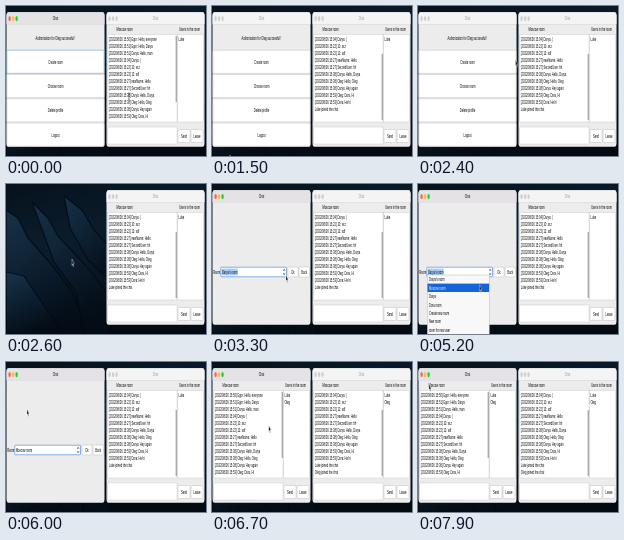
These frames come from a looping animation (200x150 px, 8000 ms). An HTML page:

```html
<!DOCTYPE html>
<html lang="en">
<head>
<meta charset="utf-8">
<title>Chat</title>
<style>
html, body { margin: 0; width: 100%; height: 100%; overflow: hidden; background: #050d16; }
svg { display: block; width: 100vw; height: 100vh; }
text { font: 5.6px "Liberation Sans", Arial, sans-serif; fill: #000; white-space: pre; }
text.pale { fill: #999; }
text.white { fill: #fff; }
</style>
</head>
<body>
<svg id="stage" viewBox="0 0 200 150" preserveAspectRatio="none"></svg>
<script>
const stage = document.getElementById('stage');
const LOOP = 8000, STEP = 100, ROW = 7, ITEM = 8.4, RIGHT = 100;
const SQUEEZE = 0.47; // the whole screen is shown narrowed, so all glyphs share this ratio

const log = [
  '15:50] Egor: Hello, everyone', '15:51] Egor: Hello, Darya', '15:51] Darya: Hello, man',
  '15:04] Darya: (', '15:22] 10: xxz', '15:22] 12: sdf', '15:27] newName: Hello',
  '15:27] SecondUser: hh', '15:38] Darya: Hello, Darya', '15:38] Oleg: Hello, Oleg',
  '15:38] Darya: Hey again', '15:53] Oleg: Dora, Hi', '15:53] Dora: He hi'
].map(s => '[2022/08/26 ' + s).concat('Luke joined the chat', 'Oleg joined the chat');
const rooms = ["Darya's room", 'Moscow room', 'Darya', 'Dora room', 'Create new room', 'New room', 'room for new user'];

// cursor stops: time, x, y
const path = [
  [0, 123, 87], [600, 18, 149], [1600, 18, 149], [2000, 62, 62], [2250, 145, 22], [2500, 66, 75],
  [2800, 66, 75], [3300, 74, 91], [3500, 71, 87], [3900, 71, 87], [4500, 110, 30], [4600, 110, 30],
  [4800, 60, 88], [5300, 62, 104], [5500, 62, 104], [6000, 21, 47], [6200, 113, 60], [6400, 80, 87],
  [6500, 80, 87], [7000, 22, 28], [7100, 22, 28], [7500, 6, 26], [7900, 11, 22], [8000, 11, 22]
];

const rect = (x, y, w, h, fill, more = '') =>
  `<rect x="${x}" y="${y}" width="${w}" height="${h}" fill="${fill}" ${more}/>`;
const label = (x, y, s, anchor = 'middle', cls = '') =>
  `<text class="${cls}" text-anchor="${anchor}" transform="translate(${x} ${y + 1.9}) scale(${SQUEEZE} 1)">${s}</text>`;
const button = (x, y, w, h, s, stroke = '#c8c8c8') =>
  rect(x, y, w, h, '#fff', `rx=".8" stroke="${stroke}" stroke-width=".6"`) + label(x + w / 2, y + h / 2, s);

function frame(active, body) {
  const lights = active ? ['#ff5f57', '#febc2e', '#28c840'] : ['#d0d0d0', '#d0d0d0', '#d0d0d0'];
  return rect(0.5, 6.3, 98, 134.5, '#ececec', 'rx="2" ry="4"') +
    `<path d="M.5 18V10.3Q.5 6.3 2.5 6.3H96.5Q98.5 6.3 98.5 10.3V18Z" fill="${active ? '#e4e2e4' : '#f4f4f4'}"/>` +
    rect(0.5, 18, 98, 0.4, '#cfcfcf') +
    lights.map((c, i) => `<ellipse cx="${3.6 + i * 3.5}" cy="12.6" rx="1.2" ry="2.6" fill="${c}"/>`).join('') +
    label(49.5, 12.5, 'Chat', 'middle', active ? '' : 'pale') + body;
}

function menu(active) {
  return label(49, 32, 'Authorization for Oleg successful!') +
    ['Create room', 'Choose room', 'Delete profile', 'Logout'].map((s, i) =>
      button(0.9, 44.2 + i * 24.3, 97.2, 23.1, s, active && !i ? '#6ea3dc' : '#c8c8c8')).join('');
}

function chat(first, last, users) {
  const box = 'stroke="#c4c4c4" stroke-width=".4"';
  return label(18.6, 23.5, 'Moscow room') + label(83.5, 23.5, 'Users in the room') +
    rect(1.8, 28.5, 69.2, 87.5, '#fff', box) + rect(71.7, 28.5, 25.7, 87.5, '#fff', box) +
    log.slice(first, last).map((s, i) => label(2.8, 33 + i * ROW, s, 'start')).join('') +
    users.map((s, i) => label(72.5, 33 + i * ROW, s, 'start')).join('') +
    rect(69.7, first ? 48 : 30, 1, 66, '#8a8a8a', 'rx=".5"') +
    rect(1.8, 121, 69.2, 17, '#fff', box) +
    button(72, 123.5, 12, 13, 'Send') + button(85, 123.5, 12, 13, 'Leave');
}

function picker(room, marked) {
  return label(1.2, 88, 'Rooms:', 'start') +
    rect(8.8, 83.2, 65.7, 9.6, '#fff', 'rx=".6" stroke="#78a9e0" stroke-width=".9"') +
    (marked ? rect(9.6, 84.6, 16, 6.8, '#a8cdfb') : '') +
    label(9.9, 88, room, 'start') +
    '<path d="M71.3 87L72.2 85L73.1 87M71.3 89L72.2 91L73.1 89" fill="none" stroke="#333" stroke-width=".5"/>' +
    button(76, 83, 10, 10, 'Ok') + button(87, 83, 10.5, 10, 'Back');
}

function popup(current) {
  return rect(9.3, 91, 62, 60, '#f8f8f8', 'stroke="#aaa" stroke-width=".4"') +
    rooms.map((s, i) => (i === current ? rect(9.5, 91.2 + i * ITEM, 61.6, ITEM, '#1763d8') : '') +
      label(11, 95.4 + i * ITEM, s, 'start', i === current ? 'white' : '')).join('');
}

const wallpaper = `<defs>
  <linearGradient id="night" x2=".3" y2="1"><stop stop-color="#06121d"/><stop offset=".45" stop-color="#0b1d2d"/><stop offset="1" stop-color="#040a12"/></linearGradient>
  <linearGradient id="ridge" x2=".4" y2="1"><stop stop-color="#1d3b54"/><stop offset=".6" stop-color="#0c1e2f"/><stop offset="1" stop-color="#050d16"/></linearGradient>
  </defs>` + rect(0, 0, 200, 150, 'url(#night)') +
  ['M0 26L12 34L22 54L45 80L66 108L84 150H0Z', 'M26 18L42 34L52 52L80 82L104 112V150H78L70 108L48 78Z',
   'M58 12L76 26L88 46L110 70V104L82 76L64 44Z', 'M0 88L18 92L30 110L58 150H0Z']
    .map(d => `<path d="${d}" fill="url(#ridge)" stroke="#030910" stroke-width="1.2" stroke-linejoin="round" opacity=".75"/>`).join('');

function cursor(t) {
  const i = path.findIndex(p => p[0] > t);
  const [a, b] = [path[i - 1], path[i]];
  const k = (t - a[0]) / (b[0] - a[0]);
  const x = a[1] + (b[1] - a[1]) * k, y = a[2] + (b[2] - a[2]) * k;
  const place = `transform="translate(${x} ${y}) scale(${SQUEEZE} 1)"`;
  const overText = x > RIGHT + 2 && x < RIGHT + 70 && y > 29 && y < 116;
  return overText
    ? `<path ${place} d="M-1.2 0H1.2M0 0V6.6M-1.2 6.6H1.2" stroke="#000" stroke-width=".7"/>`
    : `<path ${place} d="M0 0V6.4L1.5 5L2.6 7.6L3.7 7.1L2.6 4.7H4.7Z" fill="#000" stroke="#fff" stroke-width=".5"/>`;
}

function leftWindow(t) {
  if (t < 2600) return frame(t < 800, menu(t < 800));
  if (t < 2800) return '';
  if (t < 6500) return frame(true, picker(rooms[t < 5600 ? 0 : 1], t < 5600));
  return frame(true, chat(0, 12, ['Luke', 'Oleg']));
}

function rightWindow(t) {
  const joined = t >= 6500, scrolled = t >= 1100;
  const last = joined ? 15 : scrolled ? 14 : 12;
  const users = joined ? ['Luke', 'Oleg'] : ['Luke'];
  return `<g transform="translate(${RIGHT})">${frame(false, chat(scrolled ? 3 : 0, last, users))}</g>`;
}

let shown = -1;
function draw(now) {
  const t = Math.floor(now % LOOP / STEP) * STEP;
  if (t !== shown) {
    shown = t;
    const list = t >= 3500 && t < 5600 ? popup(t < 5100 ? 0 : 1) : '';
    stage.innerHTML = wallpaper + leftWindow(t) + rightWindow(t) + list + cursor(t);
  }
  requestAnimationFrame(draw);
}
draw(performance.now());
</script>
</body>
</html>
```
